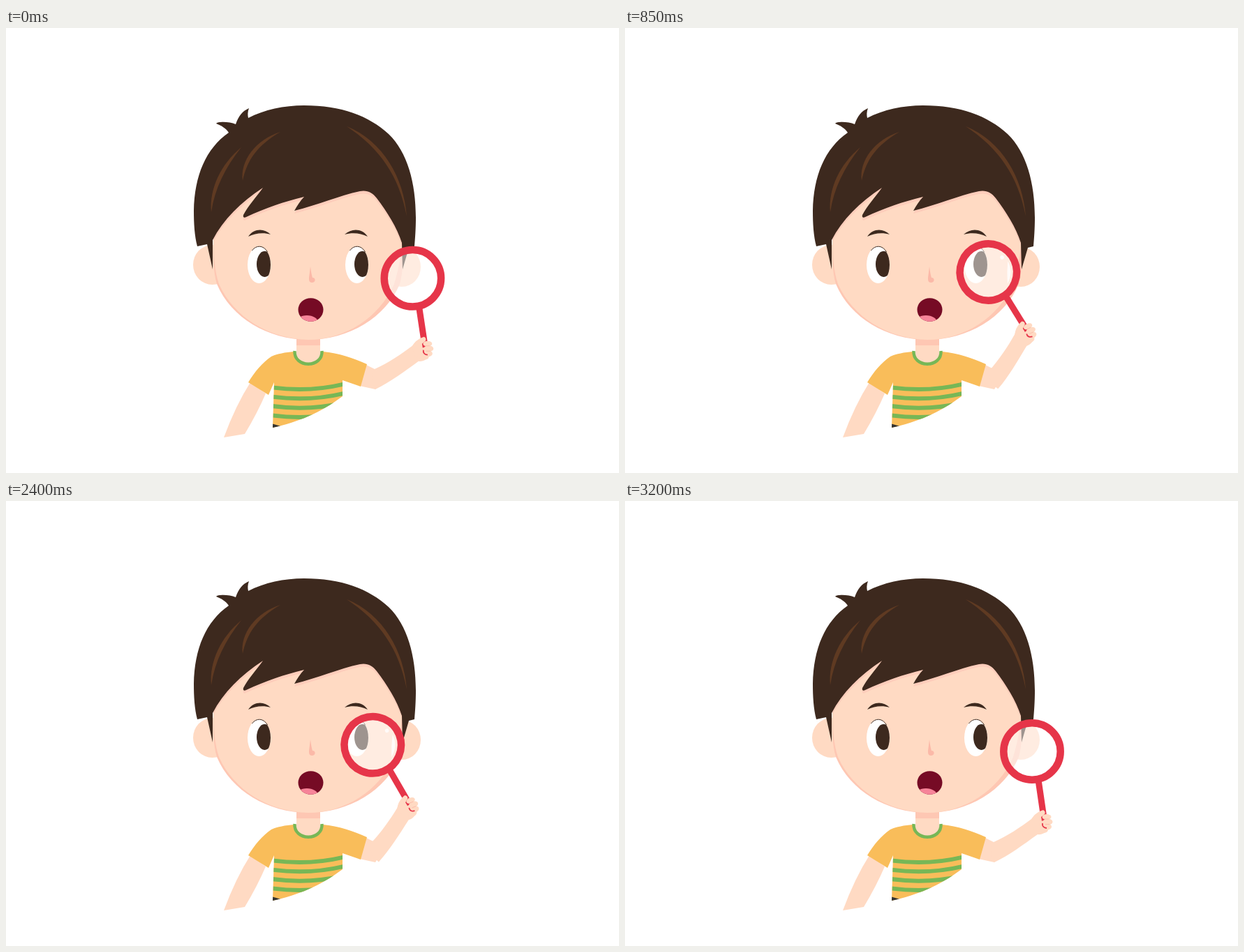
An HTML page with a canvas for the animation above (3950 ms loop, 878x638 px).

```html
<!DOCTYPE html>
<html lang="en">
<head>
<meta charset="utf-8">
<title>Boy with a magnifying glass</title>
<style>
html, body { margin: 0; width: 100%; height: 100%; overflow: hidden; background: #fff; }
canvas { display: block; }
</style>
</head>
<body>
<canvas id="stage" width="878" height="638"></canvas>
<script>
const ctx = document.getElementById('stage').getContext('2d');
const LOOP = 3950, STEP = 50, SWING = 1000, BACK = 2200, LEAD = 8;
const ANGLE = -27.4 * Math.PI / 180;
const PIVOT = { x: 530, y: 505 };
const LENS = { x: 583, y: 359 };
const C = {
  skin: '#ffdac3', blush: '#fec7b3', shade: '#fecdbb', nose: '#fbb9a8', hair: '#3d291e', shine: '#5f3a22',
  shirt: '#f9bd5a', green: '#77b756', red: '#e63549', mouth: '#760b25', tongue: '#f68499',
  trousers: '#333331'
};

const BROW_LINE = 'C568 235 530 200 433 200 C336 200 297 235 297 300Z';
const FACE = new Path2D('M297 300 C296 325 297 350 302 367 C322 415 375 447 433 447 ' +
  'C491 447 544 415 564 367 C569 350 569 325 568 300 ' + BROW_LINE);
const FACE_LIT = new Path2D('M297 300 C297 325 299 350 305 367 C326 415 378 446 433 447 ' +
  'C486 447 535 415 556 367 C561 350 567 325 568 300 ' + BROW_LINE);
const FRINGE = 'C311 275 336 250 368 229 C358 243 346 256 340 268 C339 271 341 273 344 271 ' +
  'C372 258 398 249 427 242 C421 248 417 255 413 262 C446 254 478 240 507 234 C517 232 525 236 531 244 C546 264 560 286 567 308 ';
const HAIR = new Path2D('M274 313 C270 298 269 280 269 262 C270 212 286 173 319 150 ' +
  'C315 144 309 140 301 137 C303 134 320 134 329 138 C333 126 339 119 348 115 C346 120 346 125 347 129 ' +
  'C370 117 398 111 427 111 C480 111 520 126 548 152 C575 178 587 222 587 272 C587 288 586 301 585 313 ' +
  'L577 315 L568 346 L567 308 C560 286 546 264 531 244 C525 236 517 232 507 234 C478 240 446 254 413 262 ' +
  'C417 255 421 248 427 242 C398 249 372 258 344 271 C341 273 339 271 340 268 C346 256 358 243 368 229 ' +
  'C336 250 311 275 296 304 L296 346 L288 310 Z');
const FRINGE_SHADE = new Path2D('M296 304 ' + FRINGE + 'L560 200 L310 200 Z');
const SHIRT = new Path2D('M412 464 C400 465 389 467 380 471 C367 480 356 493 347 508 L376 526 L384 508 ' +
  'L382 573 C418 565 450 552 482 528 L482 505 L508 514 L517 482 C497 473 477 466 454 464 C454 490 412 490 412 464Z');

const fill = (shape, color) => {
  ctx.fillStyle = color;
  ctx.fill(typeof shape === 'string' ? new Path2D(shape) : shape);
};
const line = (shape, color, width) => {
  ctx.strokeStyle = color;
  ctx.lineWidth = width;
  ctx.stroke(new Path2D(shape));
};
const oval = (x, y, rx, ry) => {
  const p = new Path2D();
  p.ellipse(x, y, rx, ry, 0, 0, 2 * Math.PI);
  return p;
};
const clipped = (shape, draw) => {
  ctx.save();
  ctx.clip(shape);
  draw();
  ctx.restore();
};

function drawBody() {
  fill('M350 508 Q329 541 312 587 L342 582 Q360 552 372 524Z', C.skin);
  fill('M510 480 L506 513 L529 518 L540 500 L528 489Z', C.skin);
  fill('M416 440 H450 V472 Q445 483 433 483 Q421 483 416 472Z', C.skin);
  fill('M416 440 H450 V455 H416Z', C.blush);
  fill(SHIRT, C.shirt);
  clipped(SHIRT, () => {
    const torso = new Path2D('M384 490 H482 V540 L382 580Z');
    clipped(torso, () => {
      for (let i = 0; i < 4; i++) {
        const y = 515 + i * 13.3;
        line(`M378 ${y} Q435 ${y + 8} 486 ${y - 5}`, C.green, 6);
      }
    });
    fill('M380 567 L394 571 L380 576Z', C.trousers);
  });
  line('M413.5 463 C412 488 454 488 452.5 463', C.green, 4.5);
}

function drawEye(x) {
  const white = oval(x, 339.5, 16.5, 26.5);
  fill(white, '#fff');
  clipped(white, () => fill(oval(x + 8, 338.5, 11.5, 18.5), C.hair));
  line(`M${x - 10} 319 C${x - 4} 311 ${x + 6} 311 ${x + 12} 321`, C.hair, 1);
}

function drawHead() {
  fill(oval(295.5, 339.5, 27.5, 28.5), C.skin);
  fill(oval(567, 342.5, 27, 28.5), C.skin);
  fill(FACE, C.blush);
  fill(FACE_LIT, C.skin);
  clipped(FACE, () => {
    ctx.translate(0, 4);
    fill(FRINGE_SHADE, C.shade);
  });
  fill(HAIR, C.hair);
  fill('M337 171 C308 195 291 230 294 264 C299 230 314 200 337 171Z', C.shine);
  fill('M393 149 C358 160 335 190 339 219 C345 190 360 168 393 149Z', C.shine);
  fill('M488 141 C540 162 570 215 574 270 C563 212 535 172 488 141Z', C.shine);

  drawEye(362.5);
  drawEye(502.5);
  fill('M347 299 C355 287 370 287 379 296 C369 293 357 294 347 299Z', C.hair);
  fill('M518 299 C510 287 495 287 485 296 C496 293 508 294 518 299Z', C.hair);
  fill('M436 342 C437 350 438 355 439 358 C444 358 444 365 438 365 C434 365 434 361 434 358Z', C.nose);

  const mouth = oval(436.5, 404, 18, 16.8);
  fill(mouth, C.mouth);
  clipped(mouth, () => fill(oval(431, 422, 16, 10), C.tongue));
}

function drawLens() {
  const { x, y } = LENS;
  fill(oval(x, y, 38, 38), 'rgba(255,255,255,.5)');
  ctx.save();
  ctx.translate(x, y);
  const glint = new Path2D();
  glint.arc(0, 0, 32, -0.1, 0.95);
  glint.quadraticCurveTo(24, 11, 32 * Math.cos(0.1), -32 * Math.sin(0.1));
  fill(glint, 'rgba(255,255,255,.8)');
  fill(oval(26.5, -11.5, 2.8, 2.8), 'rgba(255,255,255,.8)');
  ctx.restore();
  ctx.strokeStyle = C.red;
  ctx.lineWidth = 10.5;
  ctx.stroke(oval(x, y, 40.7, 40.7));
}

function drawForearm(angle) {
  ctx.save();
  ctx.translate(PIVOT.x, PIVOT.y);
  ctx.rotate(angle);
  ctx.translate(-PIVOT.x, -PIVOT.y);
  drawLens();
  fill('M528 489 C548 480 566 468 582 456 L588 449 L604 452 L605 472 Q599 479 591 478 ' +
    'C570 493 550 508 529 518 Q520 503 528 489Z', C.skin);
  line('M592.3 402 L600.5 458', C.red, 9);
  // thumb, then the curled fingers
  fill('M582 457 C585 450 592 445 599 443 Q603 445 601 449 L596 453 Q598 461 596 470 L586 473Z', C.skin);
  fill(oval(604, 453, 6.5, 4), C.skin);
  fill(oval(605.5, 460, 7, 4.5), C.skin);
  fill(oval(604.5, 467, 6.5, 4.5), C.skin);
  fill('M594 468 L606 469 Q607 475 600 476 L592 477Z', C.skin);
  line('M598 462 Q597 468 604 469', C.red, 1.8);
  line('M601 456 H607 M602 463.5 H608', C.nose, 0.8);
  ctx.restore();
}

const clamp = v => Math.min(1, Math.max(0, v));

function swingAt(t) {
  if (t < BACK) return clamp((t + LEAD) / SWING);
  return 1 - clamp((t - BACK + LEAD) / SWING);
}

function render(now) {
  const t = Math.floor((now % LOOP) / STEP) * STEP;
  ctx.fillStyle = '#fff';
  ctx.fillRect(0, 0, 878, 638);
  drawBody();
  drawHead();
  drawForearm(ANGLE * swingAt(t));
}

let start;
function tick(now) {
  if (start === undefined) start = now;
  render(now - start);
  requestAnimationFrame(tick);
}
requestAnimationFrame(tick);
</script>
</body>
</html>
```
